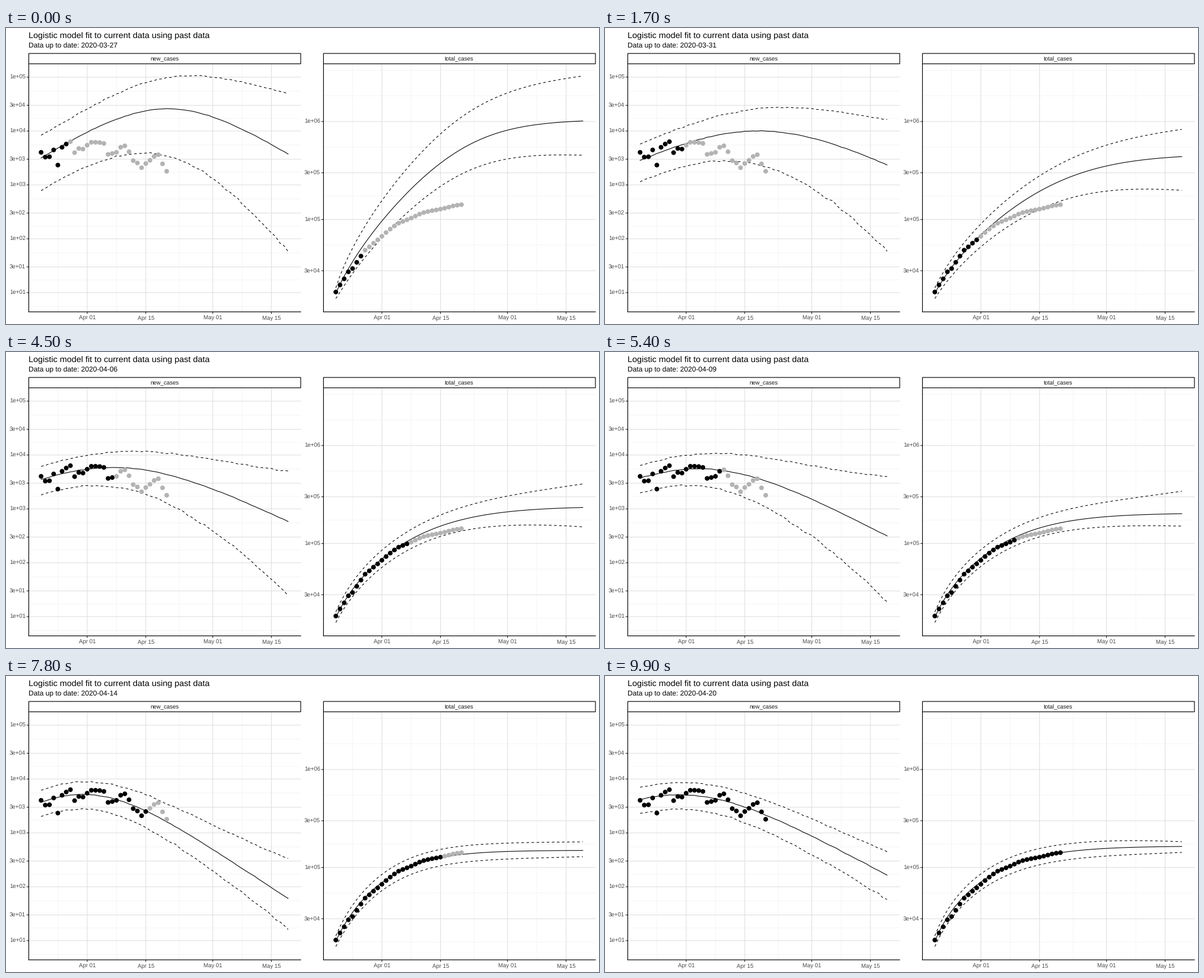
A matplotlib script that plays this animation: 1000x500 px, repeating every 10 s.

```python
import numpy as np
import matplotlib.pyplot as plt
from matplotlib.animation import FuncAnimation
from matplotlib.patches import Rectangle

W, H, DPI = 1000, 500, 100
PX = 72 / DPI                       # points per pixel
FRAMES, INTERVAL = 100, 100
STATES = 25                         # dates from March 27 to April 20
STEP = (FRAMES - 1) / (STATES - 1)  # frames per date
DAY = 7.06                          # pixels per day
TOP, BOTTOM = 60.5, 479.5
BLACK, GREY = "black", "#b3b3b3"

plt.rcParams["font.family"] = "Liberation Sans"
plt.rcParams["text.hinting"] = "none"
plt.rcParams["path.snap"] = False

days = np.arange(60)

# Observed daily cases, in hundreds, from March 21
counts = 100 * np.array([
    40.2, 32.8, 33.3, 44.5, 23.3, 49.9, 57.3, 63.4, 39.7, 47.4, 46.2,
    54.5, 61.8, 61.8, 61.1, 58.8, 36.8, 38.2, 40.2, 49.9, 53.1, 41.2,
    28.2, 25.5, 20.8, 24.9, 28.6, 33.7, 36.3, 24.6, 17.9])


def y_new(value):
    return 174 - 91 * (np.log10(value) - 4)


def y_total(value):
    return 323.5 - 165.5 * (np.log10(value) - 5)


def running(start, daily):
    return start + np.cumsum(daily) - daily[0]


def fall(k, middle, width):
    """Smooth step from 1 down to 0."""
    return 1 / (1 + np.exp((k - middle) / width))


def curves(k):
    """Heights of the fit and its bounds, k days after March 27."""
    # Daily cases of a logistic curve
    peak = 10 ** (3.703 + 0.709 * np.exp(-k / 4.6))
    peak_day = 9.3 + 21.7 * fall(k, 9.4, 2.8)
    rate = np.interp(k, [0, 4, 8, 13, 17, 19, 24],
                     [0.113, 0.088, 0.0765, 0.094, 0.106, 0.119, 0.097])
    daily = peak / np.cosh(rate * (days - peak_day) / 2) ** 2
    total = running(17700, daily * (1 + 0.17 * np.exp(-k / 5)))

    # The bounds widen with time, less so once the peak is known
    s = days / days[-1]
    new_high = (20 + 18 * np.exp(-k / 5)
                + np.interp(k, [0, 4, 9, 13, 24], [65, 48, 47, 79, 20]) * s ** 2.2)
    new_low = (24 + 31 * np.exp(-k / 4)
               + (15 + 95 * fall(k, 15, 2)) * s ** 2.2)
    near = 9 + 5 * (1 - np.exp(-days / 4))
    bend = s ** (0.65 + 0.12 * k)
    total_high = near + np.interp(k, [0, 4, 13, 17, 24], [62, 32, 24, 3, -6]) * bend
    total_low = near + (48 * fall(k, 10.8, 1.8) - 4) * bend

    rng = np.random.default_rng(k)
    jag = rng.normal(size=(3, days.size))
    mid, sums = y_new(daily), y_total(total)
    return [mid + 0.25 * jag[0],
            mid - new_high + 0.5 * jag[1],
            mid + new_low + (0.4 + 0.8 * s) * jag[2],
            sums, sums - total_high, sums + total_low]


all_curves = [curves(k) for k in range(STATES)]
starts = [round(k * STEP + 1) - 1 for k in range(STATES)]

fig = plt.figure(figsize=(W / DPI, H / DPI), dpi=DPI, facecolor="white")
ax = fig.add_axes([0, 0, 1, 1])
ax.set_xlim(0, W)
ax.set_ylim(H, 0)
ax.axis("off")


def line(xs, ys, color, width, z=1, **kw):
    return ax.plot(xs, ys, color=color, lw=width * PX, zorder=z, **kw)[0]


def label(x, y, text, size, color=BLACK, ha="left"):
    return ax.text(x, y, text, size=size * PX, color=color, ha=ha,
                   va="baseline", zorder=6)


def draw_panel(left, title, y_of, breaks):
    right, x0 = left + 458.6, left + 20.8

    def grid_x(t, color, width, z):
        line([x0 + DAY * t] * 2, [TOP, BOTTOM], color, width, z)

    def grid_y(y, color, width, z):
        line([left, right], [y, y], color, width, z)

    for t in (4, 18, 33, 48):
        grid_x(t, "#efefef", 0.58, 1)
    for t, text in {11: "Apr 01", 25: "Apr 15", 41: "May 01", 55: "May 15"}.items():
        x = x0 + DAY * t
        grid_x(t, "#e1e1e1", 1.16, 2)
        line([x, x], [BOTTOM, BOTTOM + 3], "#333333", 1.16, 2)
        label(x, 493, text, 9.6, "#4d4d4d", "center")

    ys = [y_of(b) for b in breaks]
    below = ys[0] + ys[1] - ys[2]
    above = ys[-1] + ys[1] - ys[0]
    edges = [below, *ys, above]
    minor = [(a + b) / 2 for a, b in zip(edges, edges[1:])] + [above]
    for y in minor:
        if TOP + 3 < y < BOTTOM:
            grid_y(y, "#efefef", 0.58, 1)
    for value, y in zip(breaks, ys):
        grid_y(y, "#e1e1e1", 1.16, 2)
        line([left - 3, left], [y, y], "#333333", 1.16, 2)
        label(left - 5.4, y + 3.4, f"{value:.0e}", 9.6, "#4d4d4d", "right")

    line([left, left], [TOP, BOTTOM], BLACK, 1.16, 5)
    line([left, right], [BOTTOM, BOTTOM], BLACK, 1.16, 5)
    ax.add_patch(Rectangle((left, 43), right - left, TOP - 43, fc="white",
                           ec=BLACK, lw=1.16 * PX, zorder=5))
    label((left + right) / 2, 55.2, title, 9.6, "#1a1a1a", "center")


def draw_series(x0, ys):
    xs = x0 + DAY * days
    styles = ["-", (0, (4, 4)), (0, (4, 4))]
    lines = [line(xs, xs * 0, BLACK, 1.07, 3, ls=s, dash_capstyle="butt")
             for s in styles]
    dots = ax.scatter(xs[:len(ys)], ys, s=(7.9 * PX) ** 2, lw=0, zorder=4)
    return lines, dots


LEFT, RIGHT = 38.4, 535.4
draw_panel(LEFT, "new_cases", y_new, [1e1, 3e1, 1e2, 3e2, 1e3, 3e3, 1e4, 3e4, 1e5])
draw_panel(RIGHT, "total_cases", y_total, [3e4, 1e5, 3e5, 1e6])

label(38.2, 17, "Logistic model fit to current data using past data", 14.4)
subtitle = label(38.2, 34, "", 12)

new_lines, new_dots = draw_series(LEFT + 20.8, y_new(counts))
total_lines, total_dots = draw_series(RIGHT + 20.8, y_total(running(18200, counts)))


def update(frame):
    # The data switches at the nearest frame, the date only once it is reached.
    state = sum(s <= frame for s in starts) - 1
    date = np.datetime64("2020-03-27") + int(frame / STEP)
    subtitle.set_text(f"Data up to date: {date}")
    for artist, ys in zip(new_lines + total_lines, all_curves[state]):
        artist.set_ydata(ys)
    colors = [BLACK if d <= 6 + state else GREY for d in range(len(counts))]
    new_dots.set_facecolor(colors)
    total_dots.set_facecolor(colors)
    return [subtitle, new_dots, total_dots, *new_lines, *total_lines]


anim = FuncAnimation(fig, update, frames=FRAMES, interval=INTERVAL,
                     repeat=True, blit=False)
plt.show()
```
